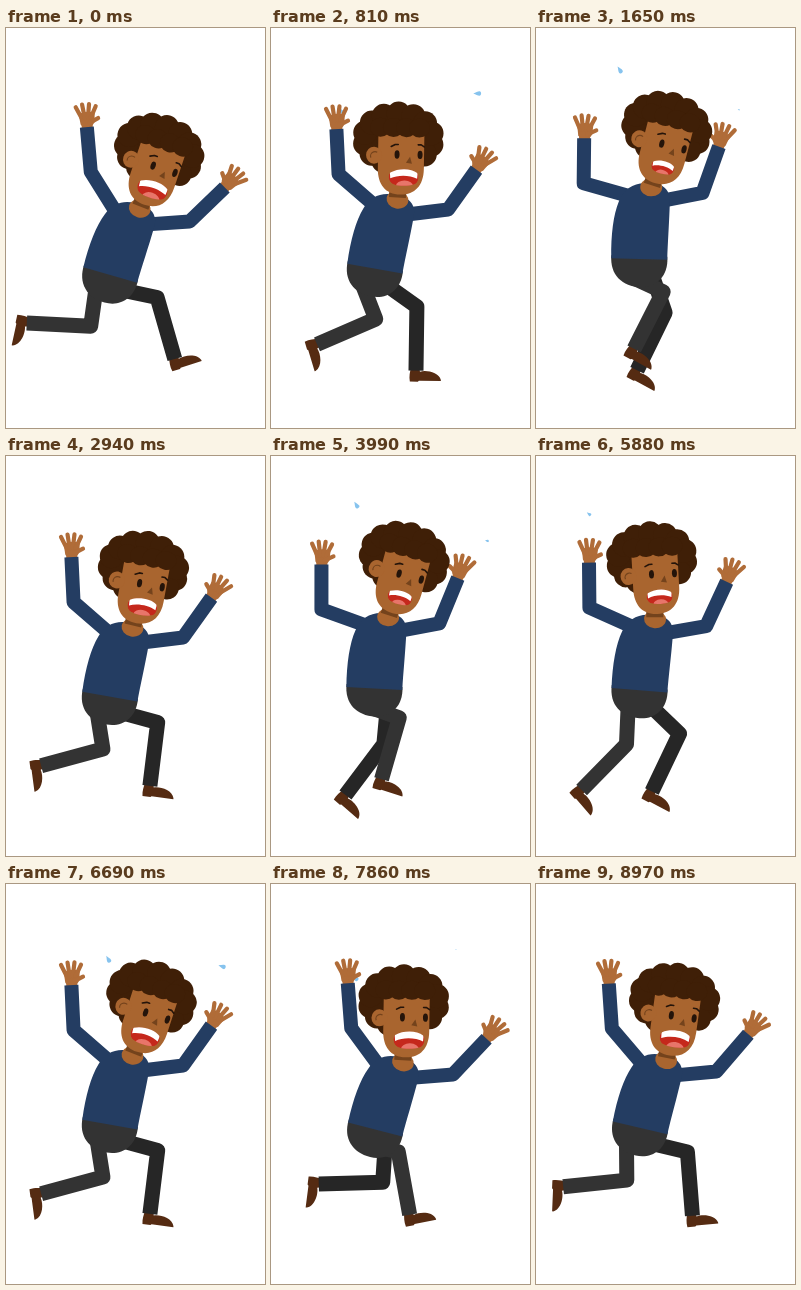
These frames come from a looping animation (259x400 px, 9000 ms). An HTML page with a canvas:

```html
<!DOCTYPE html>
<html lang="en">
<head>
<meta charset="utf-8">
<title>Panicked runner</title>
<style>
html, body { margin: 0; width: 100%; height: 100%; overflow: hidden; background: #fff; }
canvas { display: block; width: 259px; height: 400px; }
</style>
</head>
<body>
<canvas id="stage"></canvas>
<script>
const W = 259, H = 400, LOOP = 9000, STEP = 30;
const RUN = 750, BOB = 375, SHAKE = 180, SWEAT = 600;
const THIGH = 38, SHIN = 64;
const C = {
  hair: '#3f1f07', skin: '#a9652f', shade: '#74431c', hand: '#b06c38',
  sweater: '#243d62', near: '#333333', far: '#262626', shoe: '#552b12',
  ink: '#24140a', red: '#c5281c', tongue: '#e8756a', drop: '#86c3ee'
};

// Key poses of a stride: time, thigh angle, shin angle (0 hangs down, + is forward)
const stride = pass => [
  [0, -8, -93], pass, [315, 75, -7], [375, 78, 16],
  [525, 19, -26], [570, -14, -14], [690, 9, -75], [RUN, -8, -93]
];
const NEAR = stride([150, 65, -27]);
const FAR = stride([195, 17, -44]);

const canvas = document.getElementById('stage');
const ctx = canvas.getContext('2d');
const dpr = window.devicePixelRatio || 1;
canvas.width = W * dpr;
canvas.height = H * dpr;

const rad = d => d * Math.PI / 180;
const mix = (a, b, u) => a + (b - a) * u;
const clamp = v => Math.min(1, Math.max(0, v));
const polar = ([x, y], deg, len) => [x + len * Math.cos(rad(deg)), y + len * Math.sin(rad(deg))];

function pose(keys, t) {
  const i = Math.max(1, keys.findIndex(k => k[0] >= t));
  const a = keys[i - 1], b = keys[i];
  const u = (t - a[0]) / (b[0] - a[0]);
  return [mix(a[1], b[1], u), mix(a[2], b[2], u)];
}

function at(x, y, deg, draw) {
  ctx.save();
  ctx.translate(x, y);
  ctx.rotate(rad(deg));
  draw();
  ctx.restore();
}

function shape(d, color) {
  ctx.fillStyle = color;
  ctx.fill(new Path2D(d));
}

function oval(x, y, rx, ry, color) {
  ctx.fillStyle = color;
  ctx.beginPath();
  ctx.ellipse(x, y, rx, ry, 0, 0, 7);
  ctx.fill();
}

function line(points, width, color, cap = 'butt') {
  ctx.strokeStyle = color;
  ctx.lineWidth = width;
  ctx.lineCap = cap;
  ctx.lineJoin = 'round';
  ctx.beginPath();
  points.forEach(p => ctx.lineTo(...p));
  ctx.stroke();
}

function hand([x, y], deg, side) {
  at(x, y, deg, () => {
    ctx.scale(side, 1);
    line([[0, 3], [1, -6]], 11, C.hand);
    shape('M-7,-13 C-4,-16 6,-16 9,-13 L8,-4 C5,2 -4,2 -6,-3 Z', C.hand);
    for (let i = 0; i < 4; i++) {
      const tip = polar([0, -3], -118 + i * 20, 20);
      line([[tip[0] * .45, -9], tip], 4.2, C.hand, 'round');
    }
    line([[3, -4], [12, -8]], 4.2, C.hand, 'round');
  });
}

function arm(shoulder, upper, len1, fore, len2, side) {
  const elbow = polar(shoulder, upper, len1);
  const wrist = polar(elbow, fore, len2);
  hand(wrist, fore + 90, side);
  line([shoulder, elbow, wrist], 14, C.sweater);
}

function leg(hip, keys, t, color) {
  const [thigh, shin] = pose(keys, t);
  const knee = polar(hip, 90 - thigh, THIGH);
  const ankle = polar(knee, 90 - shin, SHIN);
  at(...ankle, -1.1 * shin, () =>
    shape('M-5,-3 L3,-3 L4,1 C10,-1 23,1 25,9 L25,10 L3,10 L2,11 L-6,11 C-7,6 -6,1 -5,-3 Z', C.shoe));
  line([hip, knee, ankle], 15, color);
}

function drop(x, y, deg, size) {
  at(x, y, deg, () => {
    ctx.scale(size, size);
    shape('M0,-5 C1,-2 2.5,0 2.5,2 C2.5,4.5 -2.5,4.5 -2.5,2 C-2.5,0 -1,-2 0,-5 Z', C.drop);
  });
}

// Left drop shoots out and rises, right drop arcs and shrinks
function sweat(p) {
  const size = .85 * clamp((.87 - p) * 10);
  if (size > 0) drop(-60 + 28 * Math.exp(-9 * p), -84 - 40 * p * p, -48, size);
  const q = (p - .09) / .7;
  if (q > 0 && q < 1)
    drop(50 + 33 * Math.sin(.9 * Math.PI * q), -115 + 18 * q, -90, clamp(q * 10) * (1 - .85 * q * q));
}

function hair() {
  oval(0, -61, 36, 29, C.hair);
  for (let i = 0; i < 14; i++) {
    const a = i / 14 * Math.PI * 2 + .22;
    oval(34 * Math.cos(a), -62 + 25 * Math.sin(a), 12, 12, C.hair);
  }
}

function face() {
  shape('M-20,-72 L26,-72 L26,-32 C26,-15 17,-6 3,-6 C-12,-6 -20,-16 -20,-32 Z', C.skin);
  oval(-24, -45, 8, 8.5, C.skin);
  ctx.strokeStyle = C.shade;
  ctx.lineWidth = 1.2;
  ctx.beginPath();
  ctx.arc(-23, -44, 4.5, 2.8, 5.2);
  ctx.stroke();
  for (let x = -18; x < 26; x += 13) oval(x, -73, 10.5, 9.5, C.hair);
  for (const x of [-1, 22]) oval(x, -46, 2.5, 4.2, C.ink);
  line([[-7, -54], [-3, -56], [0, -56]], 1.6, C.ink, 'round');
  line([[20, -56], [23, -56], [26, -54]], 1.6, C.ink, 'round');
  shape('M12,-44 L14,-37 L8,-38 Z', C.shade);
}

function mouth(size) {
  const lips = 'M-14,-5 C-6,-10 8,-10 14,-5 C17,-1 15,6 11,7 C4,9 -5,9 -11,7 C-16,5 -17,-2 -14,-5 Z';
  at(6, -23, 0, () => {
    ctx.scale(size, size);
    ctx.clip(new Path2D(lips));
    shape(lips, C.red);
    oval(1, 9, 9, 6, C.tongue);
    shape('M-15,-12 L15,-12 L14,1 C6,-3 -6,-3 -14,1 Z', '#fff');
  });
}

function render(t) {
  // Triangle wave: 0 at full stride, 1 with legs passing
  const u = 1 - Math.abs(1 - 2 * (t % BOB) / BOB);
  const lean = mix(16, -2, u);
  const tilt = .4 * lean + 4.5 + 10 * Math.cos(2 * Math.PI * (t - 20) / SHAKE);
  const cx = mix(104, 103, u), cy = mix(248, 228, u);
  const cos = Math.cos(rad(lean)), sin = Math.sin(rad(lean));
  const body = (x, y) => [cx + x * cos - y * sin, cy + x * sin + y * cos];
  const neck = body(10, -72);
  const hip = body(-10, 16);

  ctx.setTransform(dpr, 0, 0, dpr, 0, 0);
  ctx.fillStyle = '#fff';
  ctx.fillRect(0, 0, W, H);

  at(...neck, tilt, () => sweat(t % SWEAT / SWEAT));
  arm(body(22, -60), mix(-4, -13, u), mix(42, 40, u), mix(-44, -77, u), 49, -1);
  arm(body(-13, -64), mix(238, 185, u), 46, mix(265, 272, u), 45, 1);
  leg([hip[0] + 24, hip[1] + 1], FAR, (t + BOB) % RUN, C.far);
  leg(hip, NEAR, t % RUN, C.near);

  at(cx, cy, lean, () => {
    shape('M-28,-4 L28,-4 C30,16 17,27 2,27 C-16,27 -29,16 -28,-4 Z', C.near);
    shape('M-28,-1 C-29,-25 -27,-45 -22,-58 C-18,-70 -8,-77 4,-77 L18,-76 C26,-73 29,-67 29,-59 C29,-38 28,-18 28,-1 Z', C.sweater);
    oval(10, -73, 11, 9, C.skin);
  });
  at(...neck, tilt, () => {
    line([[1, -22], [0, -3]], 17, C.shade);
    hair();
    face();
    mouth(1 - .4 * u * u);
  });
}

function tick() {
  const t = performance.now() % LOOP;
  render(Math.floor(t / STEP) * STEP);
  requestAnimationFrame(tick);
}
tick();
</script>
</body>
</html>
```
